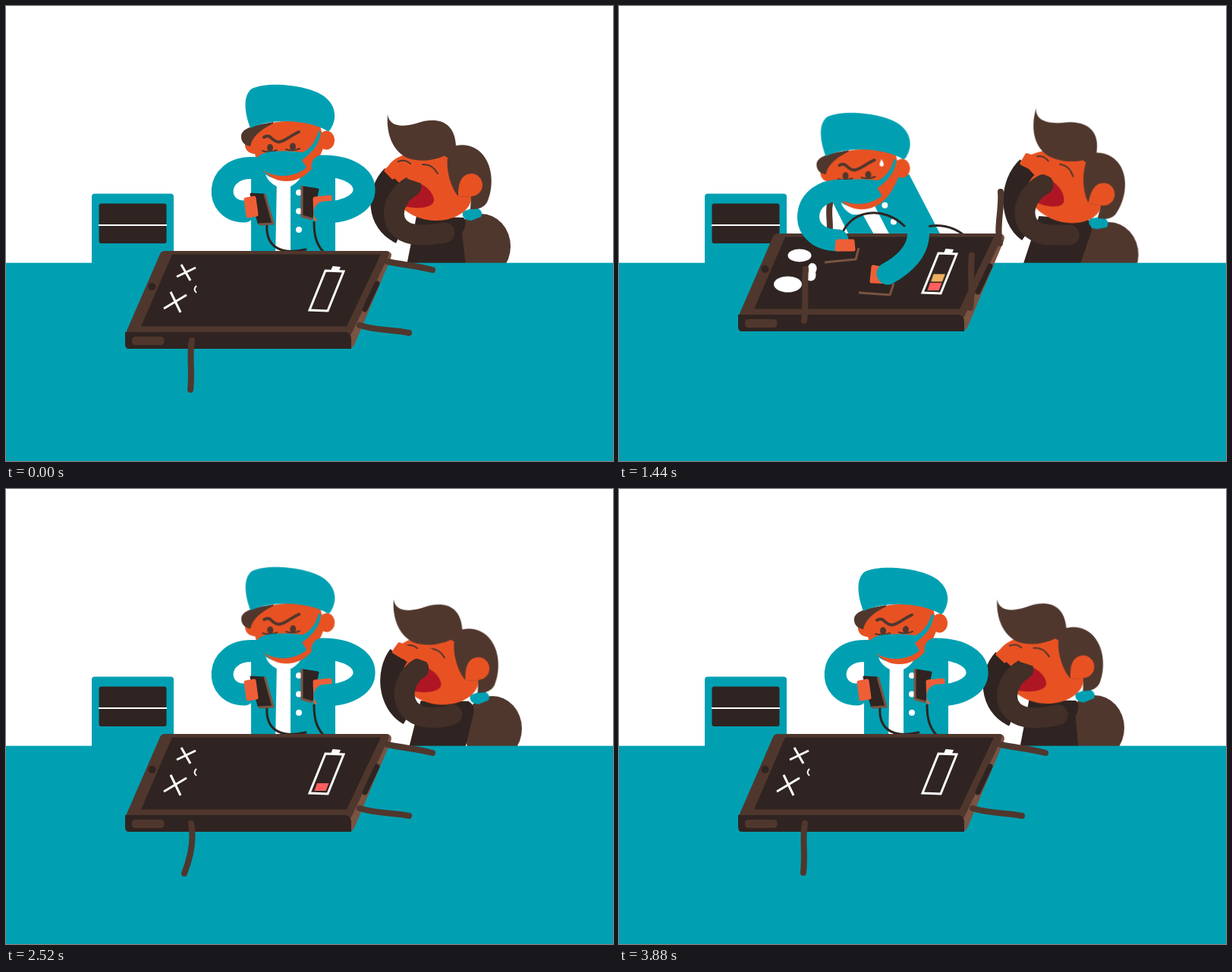
Write an HTML page without scripts that moves like this. It is 800x600 px and loops after 3920 ms.

```html
<!DOCTYPE html>
<html lang="en">
<head>
<meta charset="utf-8">
<title>Phone revival</title>
<style>
html, body { margin: 0; width: 100%; height: 100%; overflow: hidden; background: #fff; }
svg { display: block; width: 800px; height: 600px; }

.teal { fill: #00a0b2; }
.dark { fill: #2f2421; }
.brown { fill: #50372d; }
.skin { fill: #e85223; }
.white { fill: #fff; }
.line { fill: none; stroke: #50372d; stroke-width: 2; stroke-linecap: round; }
.ink { fill: none; stroke: #fff; stroke-width: 3; }
.sleeve { fill: none; stroke: #00a0b2; stroke-width: 29; stroke-linecap: round; }
.hand { fill: #ee5f38; stroke: #ee5f38; stroke-width: 5; stroke-linejoin: round; }
.palm { fill: #e85223; stroke: #e85223; }
.cable { fill: none; stroke: #2f2421; stroke-width: 3; stroke-linecap: round; }
.edge { fill: none; stroke: #7a5342; stroke-width: 3; stroke-linejoin: round; }
.pad { fill: #2f2421; stroke: #2f2421; stroke-width: 3; stroke-linejoin: round; }
.limb { fill: none; stroke: #50372d; stroke-width: 8; stroke-linecap: round; stroke-linejoin: round; }
.arm { fill: none; stroke: #2f2421; stroke-width: 28; }
.near { stroke: #412f28; stroke-width: 27; stroke-linecap: round; }

.press, .lean, .limb, .sob, .sobmove, .jolt, .eye, .cross, .bar, .pulse, .sweat {
  animation: 3.92s ease-in-out infinite;
}

/* Doctor: u upright, b leaning, c pressing down, m rising */
.press { animation-name: press; }
@keyframes press {
  0%, 20.9%, 61.2%, 100% { d: var(--u); }
  25%, 34%, 46.94% { d: var(--c, var(--b)); }
  27.55%, 40.5% { d: var(--b); }
  55.1% { d: var(--b); animation-timing-function: linear; }
  58.16% { d: var(--m); }
}
.lean { animation-name: lean; }
@keyframes lean {
  0%, 20.9%, 65.3%, 100% { transform: translate(0, 0); }
  25%, 34%, 46.94% { transform: translate(-49.5px, 42.5px); }
  27.55%, 40.5% { transform: translate(-49.5px, 28px); }
  55.1% { transform: translate(-49.5px, 28px); animation-timing-function: linear; }
  58.16% { transform: translate(-12.5px, 3.5px); }
  61.2% { transform: translate(2px, -7px); }
}
.sweat { animation-name: sweat; }
@keyframes sweat {
  0%, 10% { opacity: 0; transform: translateY(-2px); }
  14%, 20% { opacity: 1; transform: none; }
  56% { opacity: 1; transform: translateY(4px); }
  60%, 100% { opacity: 0; transform: translateY(7px); }
}

/* Woman: l start, r thrown back, k half back, f bent forward */
.sob { animation-name: sob; }
@keyframes sob {
  0% { d: var(--l); animation-timing-function: cubic-bezier(.6, .05, .8, .15); }
  19.4%, 20.4% { d: var(--r); }
  43.4%, 58.7% { d: var(--k); }
  71.4% { d: var(--f); }
  86.7% { d: var(--f); animation-timing-function: ease-in; }
  100% { d: var(--l); }
}
.sobmove { animation-name: sobmove; }
@keyframes sobmove {
  0% { transform: var(--l); animation-timing-function: cubic-bezier(.6, .05, .8, .15); }
  19.4%, 20.4% { transform: var(--r); }
  43.4%, 58.7% { transform: var(--k); }
  71.4% { transform: var(--f); }
  86.7% { transform: var(--f); animation-timing-function: ease-in; }
  100% { transform: var(--l); }
}
.head {
  transform-origin: 613px 236px;
  --l: translate(0px, 0px) rotate(0deg);
  --r: translate(32px, 23px) rotate(22.3deg);
  --k: translate(24px, 10px) rotate(9.6deg);
  --f: translate(-13px, -13px) rotate(-16.5deg);
}
.bun {
  --l: translate(626px, 317px);
  --r: translate(646px, 337px);
  --k: translate(645.5px, 326px);
  --f: translate(634px, 301px);
}

/* Phone */
.jolt { animation-name: jolt; }
@keyframes jolt {
  0%, 24.5%, 60.2%, 100% { transform: translateY(0); }
  26.5% { transform: translateY(-23px); }
  56.1% { transform: translateY(-23px); animation-timing-function: linear; }
  58.16% { transform: translateY(-12px); }
}
.limb { animation-name: limb; }
@keyframes limb {
  0%, 24.5%, 100% { d: var(--u); }
  26.5%, 55.6% { d: var(--b); }
  58.16% { d: var(--m); }
  63%, 67.3% { d: var(--v, var(--u)); }
  75.5% { d: var(--w, var(--u)); }
  80% { d: var(--x, var(--u)); }
  88% { d: var(--v, var(--u)); }
}
.eye, .cross { transform-box: fill-box; transform-origin: center; }
.eye { animation-name: eye; }
@keyframes eye {
  0%, 25%, 62%, 100% { transform: scale(0); }
  27.55% { transform: scale(.8, .97); }
  33%, 56.1% { transform: scale(1); }
  58.16% { transform: scale(.6, .68); }
}
.cross { animation-name: cross; }
@keyframes cross {
  0%, 24.5%, 60.2%, 100% { transform: scale(1); }
  26%, 56.1% { transform: scale(0); }
  58.16% { transform: scale(.95); }
}
.bar { animation-timing-function: step-end; }
.b1 { animation-name: b1; fill: #ff5f5f; }
.b2 { animation-name: b2; fill: #edb060; }
.b3 { animation-name: b3; fill: #e5d45a; }
.b4 { animation-name: b4; fill: #5fe85a; }
@keyframes b1 { 0% { opacity: 0; } 25% { opacity: 1; } 66% { opacity: 0; } }
@keyframes b2 { 0% { opacity: 0; } 31% { opacity: 1; } 64% { opacity: 0; } }
@keyframes b3 { 0% { opacity: 0; } 38% { opacity: 1; } 62% { opacity: 0; } }
@keyframes b4 { 0% { opacity: 0; } 44% { opacity: 1; } 60% { opacity: 0; } }

/* Heart monitor */
.pulse { animation-name: pulse; animation-timing-function: linear; }
@keyframes pulse {
  0%, 24.67%, 36.67%, 48.66%, 57.61%, 100% { transform: translateX(122px); }
  36.66%, 48.65% { transform: translateX(264px); }
  57.6% { transform: translateX(228px); }
}
</style>
</head>
<body>
<svg viewBox="0 0 800 600">
  <defs>
    <clipPath id="screen"><rect x="122.500" y="260.500" width="89" height="52.500" rx="3"/></clipPath>
    <path id="cell" d="M410 388H425.500L421.500 398H406.500Z"/>
  </defs>
  <rect width="800" height="600" class="white"/>

  <g id="monitor">
    <rect x="113" y="247.500" width="108" height="100" rx="4" class="teal"/>
    <rect x="122.500" y="260.500" width="89" height="52.500" rx="3" class="dark"/>
    <g clip-path="url(#screen)">
      <path class="ink pulse" style="stroke-width:1.800" d="M-145 289H-52L-49 284L-46 293L-42 276L-38 299L-34 285L-32 293L-29 276L-25 299L-21 283L-18 291L-13 277L-9 295L-6 282L-4 292L0 289H95"/>
    </g>
  </g>

  <g id="doctor">
    <path class="teal press" style="--u:path('M323 199L434 199L434 335L323 335Z');--b:path('M270 235L378 212L441 335L320 335Z');--c:path('M276 248L385 228L441 335L320 335Z');--m:path('M311 212L418 203L433 335L321 335Z')"/>
    <path class="white press" style="--u:path('M357 228L375 228L375 335L355 335Z');--b:path('M305 245L327 245L374 335L355 335Z');--c:path('M308 252L331 252L374 335L355 335Z');--m:path('M345 232L363 232L373 335L356 335Z')"/>
    <path class="press" fill="none" stroke="#fff" stroke-width="8" stroke-linecap="round" stroke-dasharray="0 24.500" style="--u:path('M386 246L386 297');--b:path('M351 259L374 304');--c:path('M350 265L374 309');--m:path('M376 249L383 300')"/>
    <g class="lean">
      <path class="white" d="M342 222Q365 238 393 214Q390 230 375 238H357Q345 232 342 222Z"/>
      <path class="skin" d="M330 166L350 154Q385 148 414 158L420 182C412 206 398 231 369 231C347 231 332 212 328 195C321 195 314 190 315 181Z"/>
      <ellipse cx="422.500" cy="177" rx="10.500" ry="12.500" class="skin"/>
      <path class="brown" d="M352 153C330 157 308 160 310 174C311 181 316 184 322 185Q325 168 352 155Z"/>
      <path class="teal" d="M322 161C314 140 312 118 324 109C345 99 395 104 416 117C434 128 437 146 429 160Q427 165 424 165C400 150 350 147 322 161Z"/>
      <path class="line" style="stroke-width:4" d="M340 173C350 167 350 181 361 179C368 178 375 171 386 166"/>
      <ellipse cx="348" cy="187" rx="4" ry="5" class="brown"/>
      <ellipse cx="378" cy="185.500" rx="4" ry="5" class="brown"/>
      <path class="line" d="M338 191Q348 194 357 190M369 189Q378 192 387 188"/>
      <path class="teal" d="M327 207Q330 194 350 192Q370 190 391 193Q406 186 412 165L415 166Q413 187 390 203L396 213C380 227 348 230 327 207Z"/>
      <path class="white sweat" d="M395.500 163Q393 168 393 170A2.700 2.700 0 0 0 398.400 170Q398 167 395.500 163Z"/>
    </g>
    <path class="cable press" style="--u:path('M344 287C342 312 355 330 395 321');--b:path('M293 303C305 267 350 264 376 290');--m:path('M340 289C360 296 380 305 395 313')"/>
    <path class="cable press" style="--u:path('M406 285C406 300 408 313 418 324');--b:path('M402 292C420 286 440 291 453 301');--m:path('M393 294C420 285 450 290 466 312')"/>
  </g>

  <g id="woman">
    <ellipse rx="39" ry="43" class="brown sobmove bun"/>
    <path class="dark sob" style="--l:path('M541 277L603 279Q609 286 601 300L606 342L528 342Z');--r:path('M556 282L620 285Q628 290 624 300L609 342L533 342Z');--k:path('M553 276L618 281Q625 286 622 298L607 342L532 342Z');--f:path('M537 284L597 278Q609 284 607 296L602 342L529 342Z')"/>
    <g class="sobmove head">
      <path class="teal" d="M602 271L619 265Q630 270 626 278L613 283Q600 282 602 271Z"/>
      <path class="skin" d="M503 213C512 192 560 185 600 195L613 251C615 268 592 284 565 283C530 282 503 255 500 225Z"/>
      <path class="brown" d="M575 196C585 181 606 181 617 187C641 199 645 235 634 259Q628 269 612 268L613 251L597 252C586 240 580 217 582 200Z"/>
      <path class="skin" d="M596 252Q595 222 613 221A15 15 0 0 1 613 251Z"/>
      <path class="brown" d="M503 143C505 157 518 161 540 155C566 146 591 150 593 184C584 201 550 209 528 200C509 190 501 168 503 143Z"/>
      <path class="line" d="M514 207Q524 200 533 208M549 209Q562 208 569 221"/>
      <path fill="#af1623" d="M537 231C552 234 564 246 564 257C562 267 540 268 525 264C520 258 524 244 537 231Z"/>
    </g>
    <path class="arm sob" style="--l:path('M509 224C488 245 488 285 520 300');--r:path('M548 206C522 225 520 275 545 295');--k:path('M536 214C514 235 512 280 538 298');--f:path('M490 228C482 250 490 285 520 298')"/>
    <path class="arm near sob" style="--l:path('M534 238C504 255 500 300 545 302C560 302 572 300 578 299');--r:path('M569 234C535 250 534 302 580 302C586 302 592 302 595 302');--k:path('M557 236C524 254 522 302 570 302C580 302 588 302 593 302');--f:path('M524 238C505 255 508 300 550 301C565 301 576 295 580 290')"/>
    <path class="hand palm sob" style="--l:path('M501 217L513 207L522 212L510 226ZM531 226L538 218L550 222L546 231Z');--r:path('M540 200L545 190L560 194L552 207ZM573 216L579 210L592 214L586 225Z');--k:path('M529 209L536 198L547 202L541 215ZM557 220L563 209L574 213L570 225Z');--f:path('M485 223L492 215L502 219L497 232ZM520 222L527 212L539 213L539 229Z')"/>
  </g>

  <rect y="338.700" width="800" height="261.300" class="teal"/>

  <g id="phone" class="jolt">
    <path class="limb" style="--u:path('M290 335C300 336 310 336 320 335');--b:path('M277 328C280 310 275 297 278 284');--m:path('M300 328C318 322 328 318 328 304')"/>
    <path fill="#7a5342" d="M498 323H503Q510 325 507 333L460 445Q457 452 452 452L450 425Z"/>
    <path class="brown" d="M209 323H500Q507 323 504 330L455 433H157L203 327Q205 323 209 323Z"/>
    <path class="dark" d="M219 327.500H494L449 422.500H178Z"/>
    <path class="dark" d="M157 430H448Q455 431 455 439V452H162Q157 452 157 446Z"/>
    <rect x="166" y="436" width="42.500" height="11" rx="4.500" class="brown"/>
    <circle cx="192.500" cy="370" r="5" class="dark"/>
    <path d="M489 366L473 400" stroke="#2f2421" stroke-width="7" stroke-linecap="round"/>

    <path class="ink" d="M421 349L445 350L424 402L400 401Z"/>
    <path class="white" d="M430.500 343L441 344L438.500 350H427.500Z"/>
    <use href="#cell" class="bar b1"/>
    <use href="#cell" x="4.500" y="-11.500" class="bar b2"/>
    <use href="#cell" x="9" y="-23" class="bar b3"/>
    <use href="#cell" x="13.500" y="-34.500" class="bar b4"/>

    <path class="ink cross" d="M231 341L243 362M225 357L250 345"/>
    <path class="ink cross" d="M217 377L230 404M208 399L238 381"/>
    <path class="ink cross" style="stroke-width:2" d="M251 369Q246 374 251 378"/>
    <ellipse cx="238" cy="352" rx="15.500" ry="8.500" class="white eye"/>
    <ellipse cx="222.500" cy="390" rx="18.500" ry="10.500" class="white eye"/>
    <path class="white eye" d="M254 362C261 362 262 370 259 374C261 383 256 387 250 385C244 383 245 376 250 373C248 367 250 363 254 362Z"/>

    <path class="limb" style="--u:path('M503 337C520 341 545 343 562 348');--b:path('M502 336C497 315 505 290 503 268');--m:path('M504 338C535 335 553 325 554 302')"/>
    <path class="limb" style="--u:path('M466 421C488 428 510 427 531 431');--b:path('M463 421C467 395 462 375 465 352');--m:path('M467 422C495 424 508 402 508 381')"/>
    <path class="limb" style="--u:path('M245 441C241 460 246 480 243 506');--b:path('M244 438C247 415 244 390 246 370');--m:path('M247 439C275 437 295 425 297 403');--v:path('M244 441C248 462 244 484 235 507');--w:path('M245 441C240 462 247 480 262 499');--x:path('M245 441C243 462 245 490 245 517')"/>
  </g>

  <g id="arms">
    <path class="pad press" style="--u:path('M333 286L350 286L340 249L323 248Z');--b:path('M273 335L311 333L315 320L280 320Z');--m:path('M323 289L338 294L341 258L327 251Z')"/>
    <path class="edge press" style="--u:path('M333 288L352 287L341 248');--b:path('M271 338L312 334L316 319');--m:path('M323 291L339 296L343 257')"/>
    <path class="pad press" style="--u:path('M392 239L392 276L403 279L411 242Z');--b:path('M319 375L356 378L361 367L322 364Z');--m:path('M368 253L379 288L391 289L385 252Z')"/>
    <path class="edge press" style="--u:path('M390 237L390 277L404 281');--b:path('M316 378L357 381L362 366');--m:path('M365 251L378 290L393 291')"/>
    <path class="hand press" style="--u:path('M407 254L427 252L427 262L408 281Z');--b:path('M335 344L346 346L358 364L333 363Z');--m:path('M387 260L405 257L406 266L390 286Z')"/>
    <path class="sleeve press" style="--u:path('M324 213.500C274 213 274 271 314 271');--b:path('M299 234C242 232 234 306 288 309');--c:path('M296 249C238 242 230 310 288 309');--m:path('M314 223.500C258 223 258 274 304 274')"/>
    <path class="sleeve press" style="--u:path('M417 211C490 211 490 272 420 272');--b:path('M378 250C394 288 402 320 354 353');--c:path('M380 264C403 288 410 325 354 353');--m:path('M404 220C478 220 478 278 404 278')"/>
    <path class="hand press" style="--u:path('M316 255L327 253L330 275L319 277Z');--b:path('M288 310L308 310L309 321L287 321Z');--m:path('M313 255L326 257L323 277L311 275Z')"/>
  </g>
</svg>
</body>
</html>
```
